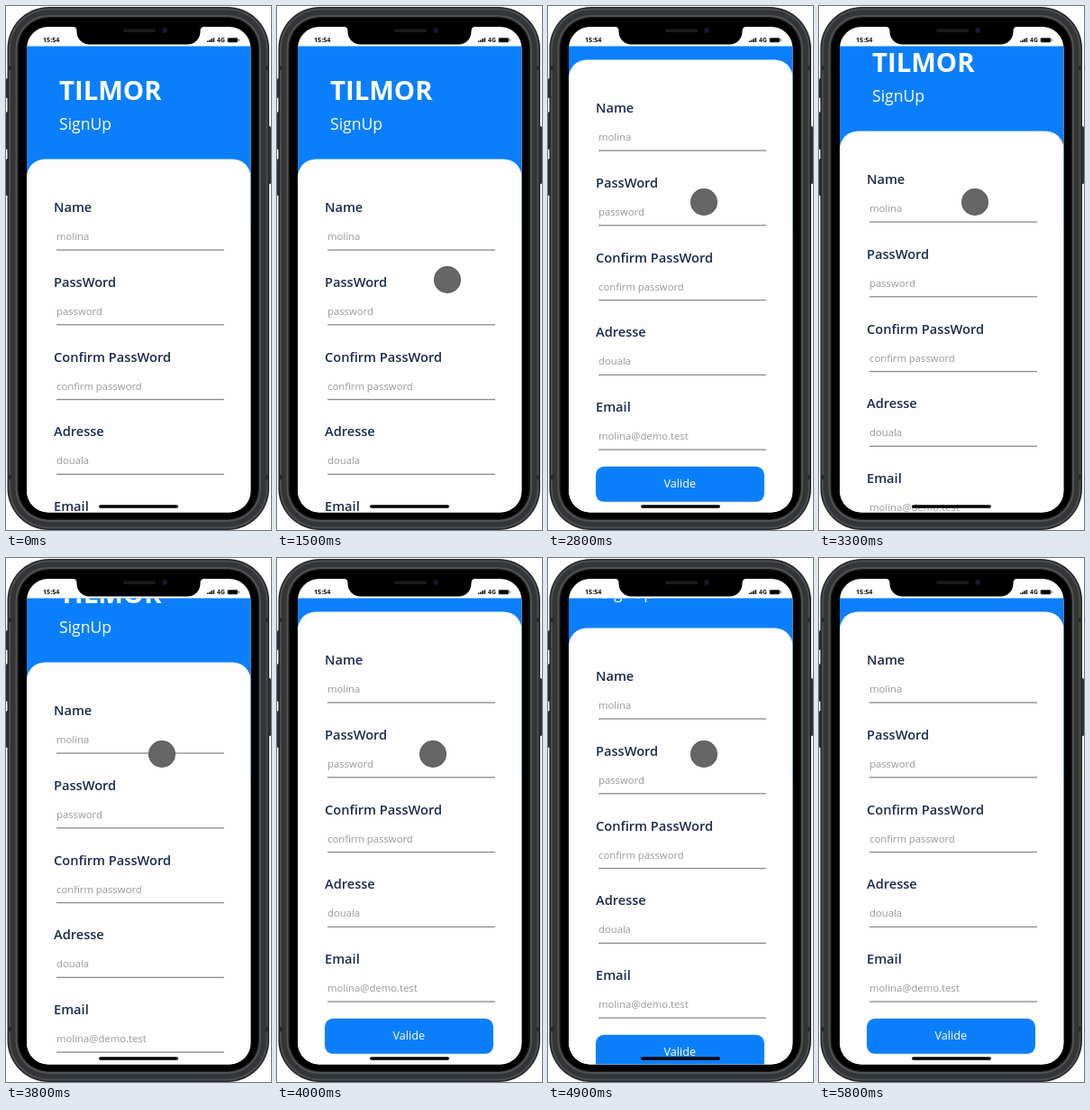
These frames come from a looping animation (294x580 px, 7.5 s). An HTML page with a canvas:

```html
<!DOCTYPE html>
<html lang="en">
<head>
<meta charset="utf-8">
<title>Sign-up form</title>
<style>
html, body { margin: 0; width: 100%; height: 100%; overflow: hidden; background: #fefefe; }
canvas { display: block; width: 294px; height: 580px; }
</style>
</head>
<body>
<canvas id="stage"></canvas>
<script>
const W = 294, H = 580, LOOP = 7500, STEP = 100, MAX_SCROLL = 110;
const FONT = '"Open Sans", "Noto Sans", sans-serif';
const BLUE = '#0b7ffb', PAPER = '#fefefe', NAVY = '#1c2c4c';

const fields = [
  ['Name', 'molina'],
  ['PassWord', 'password'],
  ['Confirm PassWord', 'confirm password'],
  ['Adresse', 'douala'],
  ['Email', 'molina@demo.test']
];

// Each wheel move: start time, number of steps, end position, ease-out power
const moves = [
  [2400, 3, MAX_SCROLL, 1.65],
  [3100, 5, 0, 1.38],
  [3800, 3, MAX_SCROLL, 1.65],
  [4300, 4, 0, 1.5],
  [4800, 3, MAX_SCROLL, 1.65],
  [5300, 3, 0, 1.65],
  [5600, 3, MAX_SCROLL, 1.65]
];
const touch = { start: 1500, end: 5800, steps: 2, from: [189, 303], to: [173, 217] };

const canvas = document.getElementById('stage');
const ctx = canvas.getContext('2d');
const dpr = window.devicePixelRatio || 1;
canvas.width = W * dpr;
canvas.height = H * dpr;

const mix = (a, b, p) => a + (b - a) * p;
const easeOut = (p, power) => 1 - Math.pow(1 - p, power);

function scrollAt(t) {
  let y = 0;
  for (const [start, steps, end, power] of moves) {
    if (t < start) break;
    const p = Math.min(1, (Math.floor((t - start) / STEP) + 1) / steps);
    y = mix(y, end, easeOut(p, power));
  }
  return Math.round(y);
}

function box(x, y, w, h, r, color) {
  ctx.fillStyle = color;
  ctx.beginPath();
  ctx.roundRect(x, y, w, h, r);
  ctx.fill();
}

function disc(x, y, r, color) {
  ctx.fillStyle = color;
  ctx.beginPath();
  ctx.arc(x, y, r, 0, Math.PI * 2);
  ctx.fill();
}

function text(str, x, y, size, color, weight = 400, align = 'left') {
  ctx.font = `${weight} ${size}px ${FONT}`;
  ctx.textAlign = align;
  ctx.fillStyle = color;
  ctx.fillText(str, x, y);
}

function drawBody() {
  for (const [y, h] of [[80, 22], [117, 42], [169, 41]]) box(0, y, 4, h, 1.5, '#303134');
  box(290, 133, 4, 64, 1.5, '#303134');
  const layers = [[0, '#252628'], [1.5, '#4b4c4f'], [3.5, '#343537'], [9, '#505255'], [11, '#1a1a1b'], [12.5, '#000']];
  for (const [inset, color] of layers) {
    box(1.5 + inset, 1 + inset, 290.5 - inset * 2, 579 - inset * 2, 46 - inset, color);
  }
  for (const x of [2, 288]) {
    box(x, 66, 4, 5, 0, '#292a2c');
    box(x, 519, 4, 5, 0, '#292a2c');
  }
}

function drawForm(scroll) {
  ctx.save();
  ctx.beginPath();
  ctx.rect(23, 44.5, 248.5, 520);
  ctx.clip();
  ctx.fillStyle = BLUE;
  ctx.fillRect(23, 44, 249, 200);
  ctx.translate(0, -scroll);
  text('TILMOR', 59, 104, 29.3, '#fff', 700);
  text('SignUp', 59, 137, 17.6, '#fff');
  box(23, 169.5, 248.5, 560, 20, PAPER);
  fields.forEach(([label, hint], i) => {
    const y = i * 82.75;
    text(label, 53, Math.round(228 + y), 14.6, NAVY, 600);
    text(hint, 56, Math.round(259 + y), 11.3, '#999');
    ctx.fillStyle = '#8c8c8c';
    ctx.fillRect(56, 269.4 + y, 186, 1.3);
  });
  box(53, 619.8, 187, 39, 9, BLUE);
  text('Valide', 146.3, 643, 12.6, '#fff', 400, 'center');
  ctx.restore();
}

function drawStatus() {
  text('15:54', 41, 40, 7.2, '#111', 700);
  for (let i = 0; i < 4; i++) {
    const h = 1.5 + i * 1.1;
    box(223 + i * 2.2, 40 - h, 1.6, h, 0.3, '#111');
  }
  text('4G', 234, 40, 6.8, '#111', 700);
  box(245.5, 35, 12, 5.4, 1.4, '#777');
  box(246.3, 35.7, 10.4, 4, 0.8, '#000');
  box(258, 36.6, 1.2, 2.2, 0.5, '#777');
}

function drawNotch() {
  ctx.fillStyle = '#000';
  ctx.beginPath();
  ctx.moveTo(74, 22);
  ctx.lineTo(74, 23);
  ctx.quadraticCurveTo(78.5, 23, 78.5, 28);
  ctx.arcTo(78.5, 42.5, 94, 42.5, 14);
  ctx.arcTo(215.5, 42.5, 215.5, 28, 14);
  ctx.lineTo(215.5, 28);
  ctx.quadraticCurveTo(215.5, 23, 220, 23);
  ctx.lineTo(220, 22);
  ctx.fill();
  box(130, 25.5, 36, 3.5, 1.75, '#1c1c1e');
  disc(176, 27, 3.3, '#12121c');
  disc(176, 27, 1.6, '#20204a');
}

function drawTouch(t) {
  if (t < touch.start || t >= touch.end) return;
  const p = easeOut(Math.min(1, Math.floor((t - touch.start) / STEP) / touch.steps), 2);
  const [x, y] = touch.from.map((v, i) => mix(v, touch.to[i], p));
  disc(x, y, 15, '#585858');
  disc(x, y, 14, '#666');
}

function draw(t) {
  ctx.setTransform(dpr, 0, 0, dpr, 0, 0);
  ctx.fillStyle = PAPER;
  ctx.fillRect(0, 0, W, H);
  drawBody();
  ctx.save();
  ctx.beginPath();
  ctx.roundRect(23, 23, 248.5, 537.5, 24);
  ctx.clip();
  ctx.fillStyle = PAPER;
  ctx.fillRect(23, 23, 249, 538);
  drawForm(scrollAt(t));
  drawStatus();
  ctx.restore();
  drawNotch();
  box(103, 552.3, 88, 3.4, 1.7, '#000');
  drawTouch(t);
}

let origin = null;
function tick(now) {
  if (origin === null) origin = now;
  draw((now - origin) % LOOP);
  requestAnimationFrame(tick);
}
draw(0);
requestAnimationFrame(tick);
</script>
</body>
</html>
```
